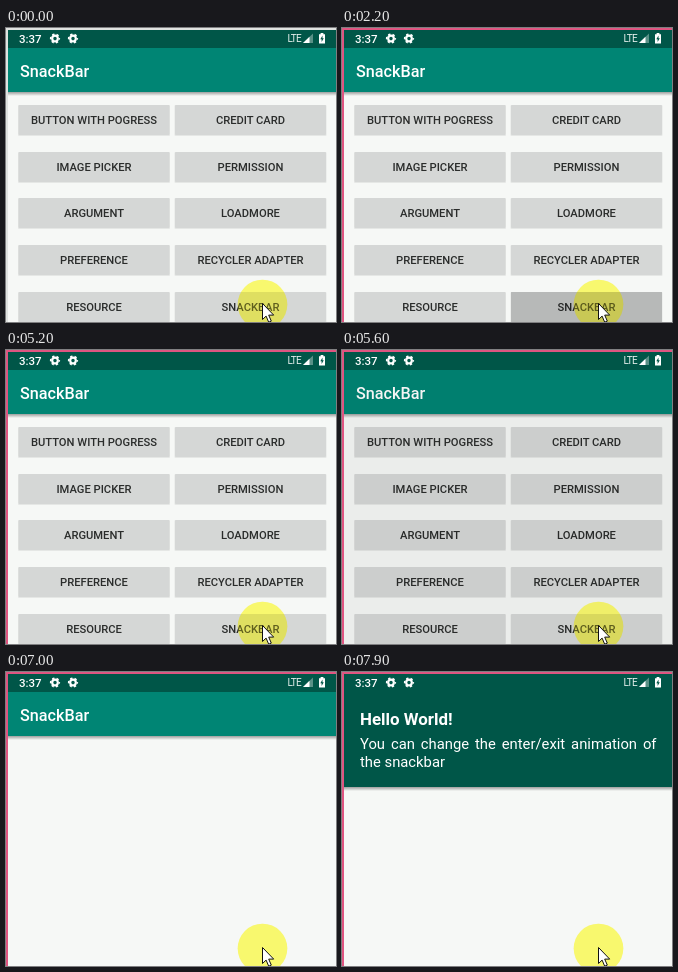
These frames come from a looping animation (330x294 px, 8 s). An HTML page:

```html
<!DOCTYPE html>
<html lang="en">
<head>
<meta charset="utf-8">
<title>SnackBar</title>
<style>
  html, body { margin: 0; width: 100%; height: 100%; overflow: hidden; background: #f6f8f6; }
  svg { display: block; width: 330px; height: 294px; font-family: Roboto, Arial, sans-serif; }
  .title { font-size: 16.2px; font-weight: 500; fill: #fff; }
  .label { font-size: 11.2px; font-weight: 500; fill: #2a2c2b; text-anchor: middle; }
  .clock { font-size: 11.5px; font-weight: 500; fill: #fff; }
  .lte { font-size: 10px; fill: #e4efec; letter-spacing: -.7px; }
  .head { font-size: 16.9px; font-weight: 700; fill: #fff; }
  .note { margin: 0; font-size: 14.8px; line-height: 17.5px; color: #fff; text-align: justify; }
  .tint { mix-blend-mode: multiply; }

  .edge, .press, .dim, .next, .snack { animation: 8s step-end infinite; }
  .edge { animation-name: edge; }
  .press { animation-name: press; }
  .dim { animation-name: dim; }
  .next { animation-name: reveal; transform-box: view-box; }
  .snack { animation-name: drop; }

  @keyframes edge {
    0% { fill: #dfe2e0; }
    5% { fill: #dfbfc8; }
    6.25% { fill: #df9cb0; }
    7.5% { fill: #df7898; }
    8.75%, 100% { fill: #df5581; }
  }
  @keyframes press {
    0% { opacity: 0; }
    23.75% { opacity: .07; }
    25% { opacity: .14; }
    33.75% { opacity: .1; }
    35% { opacity: .04; }
    36.25%, 100% { opacity: 0; }
  }
  @keyframes dim {
    0% { opacity: 0; }
    68.75% { opacity: .025; }
    70% { opacity: .045; }
    76.25%, 100% { opacity: 0; }
  }
  @keyframes reveal {
    0% { clip-path: inset(294px 0 0 0); }
    72.5% { clip-path: inset(190px 0 0 0); }
    73.75% { clip-path: inset(85px 0 0 0); }
    75% { clip-path: inset(30px 0 0 0); }
    76.25%, 100% { clip-path: inset(0); }
  }
  @keyframes drop {
    0% { transform: translateY(-120px); }
    90% { transform: translateY(-62px); }
    91.25% { transform: translateY(-18px); }
    92.5%, 100% { transform: translateY(0); }
  }
</style>
</head>
<body>
<svg viewBox="0 0 330 294">
  <defs>
    <linearGradient id="shade" x2="0" y2="1">
      <stop stop-color="#000" stop-opacity=".36"/>
      <stop offset="1" stop-color="#000" stop-opacity="0"/>
    </linearGradient>
    <g id="bar">
      <rect y="64" width="330" height="4" fill="url(#shade)"/>
      <rect y="20" width="330" height="44" fill="#008574"/>
      <text class="title" x="14" y="49">SnackBar</text>
    </g>
    <g id="gear" fill="none" stroke="#fff">
      <circle r="2.8" stroke-width="2.2"/>
      <circle r="4.3" stroke-width="1.6" stroke-dasharray="2.25" stroke-dashoffset="1.12"/>
    </g>
  </defs>

  <rect width="330" height="294" fill="#f6f8f6"/>
  <g id="menu"></g>
  <use href="#bar"/>
  <rect class="press" x="169" y="264" width="151" height="30"/>
  <rect class="dim" y="20" width="330" height="274"/>

  <g class="next">
    <rect width="330" height="294" fill="#f6f8f6"/>
    <use href="#bar"/>
  </g>

  <g class="snack">
    <rect y="115" width="330" height="4" fill="url(#shade)"/>
    <rect width="330" height="115" fill="#005648"/>
    <text class="head" x="18" y="53">Hello World!</text>
    <foreignObject x="18" y="64" width="296.5" height="40">
      <p class="note">You can change the enter/exit animation of the snackbar</p>
    </foreignObject>
  </g>

  <rect width="330" height="20" fill="#005648"/>
  <text class="clock" x="13" y="15">3:37</text>
  <use href="#gear" x="49" y="10.5"/>
  <use href="#gear" x="67" y="10.5"/>
  <text class="lte" x="281.5" y="14">LTE</text>
  <path d="M297 15 307 5.5V15Z" fill="#fff" opacity=".35"/>
  <path d="M297 15 303.5 8.8V15Z" fill="#fff"/>
  <path d="M313 6.3h1.6V5h2.8v1.3H319V15.5h-6Z" fill="#fff"/>
  <path d="M316.5 7.5 314.3 11.2h1.3v2.8l2.2-3.8h-1.3Z" fill="#005648"/>

  <path class="edge" d="M0 0H330V2H2V294H0Z"/>
  <circle class="tint" cx="256.5" cy="276.5" r="24.8" fill="#ffff88"/>
  <circle cx="256.5" cy="276.5" r="24.8" fill="#fff830" opacity=".25"/>
  <path d="M256.5 275.5v16l3.6-3.4 2.6 6.1 2.6-1.1-2.6-6h5Z" fill="#fff" stroke="#111"/>
</svg>
<script>
  const labels = [
    "BUTTON WITH POGRESS", "CREDIT CARD", "IMAGE PICKER", "PERMISSION", "ARGUMENT",
    "LOADMORE", "PREFERENCE", "RECYCLER ADAPTER", "RESOURCE", "SNACKBAR"
  ];
  const menu = document.getElementById("menu");

  function add(tag, attrs, text = "") {
    const el = document.createElementNS("http://www.w3.org/2000/svg", tag);
    for (const key in attrs) el.setAttribute(key, attrs[key]);
    el.textContent = text;
    menu.append(el);
  }

  labels.forEach((label, i) => {
    const x = 12.5 + (i % 2) * 156.5;
    const y = Math.round(77 + Math.floor(i / 2) * 46.7);
    const box = { x, y, width: 151, height: 30, rx: 1 };
    add("rect", { ...box, x: x - .5, width: 152, height: 31, fill: "#000", opacity: .07 });
    add("rect", { ...box, fill: "#d5d7d6" });
    add("text", { class: "label", x: x + 75.5, y: y + 19 }, label);
  });
</script>
</body>
</html>
```
